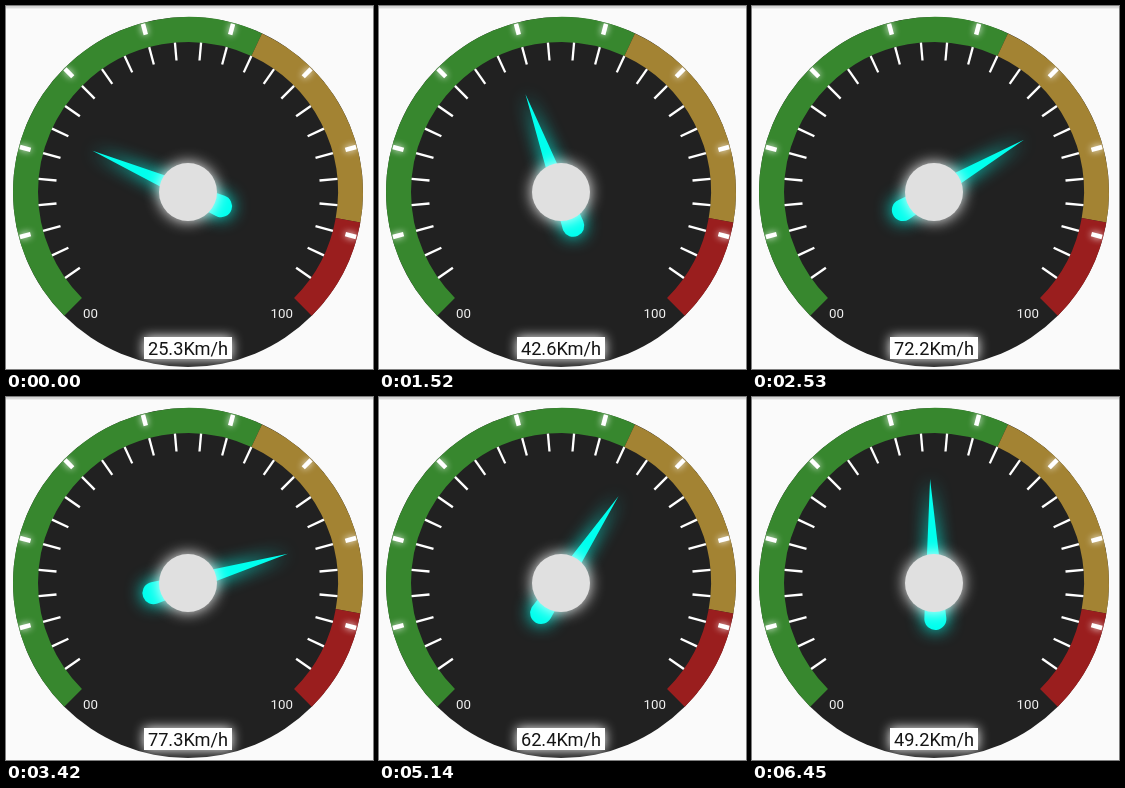
These frames come from a looping animation (367 by 363 pixels, 6480 ms). An HTML page with a canvas:

```html
<!DOCTYPE html>
<html lang="en">
<head>
<meta charset="utf-8">
<title>Speed gauge</title>
<style>
  html, body { margin: 0; width: 100%; height: 100%; overflow: hidden; background: #fafafa; }
  canvas { display: block; width: 367px; height: 363px; }
</style>
</head>
<body>
<canvas id="gauge" width="367" height="363"></canvas>
<script>
const ctx = document.getElementById('gauge').getContext('2d');
const W = 367, H = 363, CX = 182, CY = 186, R = 175;
const LOOP = 6480, STEP = 60;
const FONT = 'Roboto, "Open Sans", sans-serif';
const rad = deg => deg * Math.PI / 180;

// [time in ms, speed]
const keys = [
  [0, 25.3], [320, 23.2], [680, 26.4], [900, 26.2], [1160, 26.6],
  [1340, 33.8], [1640, 48.2], [1940, 59.0], [2000, 60.7], [2350, 69.7],
  [2700, 75.3], [3100, 78.0], [3420, 77.3], [3800, 76.4], [4010, 77.0],
  [4280, 79.6], [4480, 78.0], [4600, 74.4], [4660, 72.4], [5000, 65.0],
  [5320, 59.3], [5730, 52.2], [6100, 50.0], [6450, 49.2]
];

const secant = keys.slice(1).map(([t, v], i) => (v - keys[i][1]) / (t - keys[i][0]));

// Harmonic-mean tangents keep the curve free of overshoot.
const tangent = keys.map((_, i) => {
  const a = secant[i - 1], b = secant[i];
  if (a === undefined) return b;
  if (b === undefined) return a;
  return a * b <= 0 ? 0 : 2 * a * b / (a + b);
});

function speedAt(t) {
  let i = 0;
  while (i < keys.length - 2 && t >= keys[i + 1][0]) i++;
  const [t0, v0] = keys[i], [t1, v1] = keys[i + 1];
  const d = t1 - t0, u = Math.min(1, (t - t0) / d);
  const u2 = u * u, u3 = u2 * u;
  return v0 * (2 * u3 - 3 * u2 + 1) + v1 * (3 * u2 - 2 * u3) +
    d * (tangent[i] * (u3 - 2 * u2 + u) + tangent[i + 1] * (u3 - u2));
}

// The needle advances in even steps, realigned at these times.
const aligned = [5730, 4600, 4010, 2700, 80];

function snap(t) {
  const start = aligned.find(s => t >= s);
  return start === undefined ? 0 : start + STEP * Math.floor((t - start) / STEP);
}

function disc(x, y, r, color) {
  ctx.fillStyle = color;
  ctx.beginPath();
  ctx.arc(x, y, r, 0, 2 * Math.PI);
  ctx.fill();
}

function band(from, to, color) {
  ctx.strokeStyle = color;
  ctx.lineWidth = 25;
  ctx.beginPath();
  ctx.arc(CX, CY, R - 12.5, rad(from), rad(to));
  ctx.stroke();
}

function tick(deg, inner, outer, width) {
  const c = Math.cos(rad(deg)), s = Math.sin(rad(deg));
  ctx.strokeStyle = '#fff';
  ctx.lineWidth = width;
  ctx.beginPath();
  ctx.moveTo(CX + inner * c, CY + inner * s);
  ctx.lineTo(CX + outer * c, CY + outer * s);
  ctx.stroke();
}

function text(str, x, y, size, color) {
  ctx.font = `${size}px ${FONT}`;
  ctx.textAlign = 'center';
  ctx.fillStyle = color;
  ctx.fillText(str, x, y);
}

function withGlow(color, blur, paint) {
  ctx.save();
  ctx.shadowColor = color;
  ctx.shadowBlur = blur;
  paint();
  ctx.restore();
}

function drawDial() {
  ctx.fillStyle = '#fafafa';
  ctx.fillRect(0, 0, W, H);
  ['#d2d2d2', '#d9d9d9', '#ececec'].forEach((color, y) => {
    ctx.fillStyle = color;
    ctx.fillRect(0, y, W, 1);
  });

  disc(CX, CY, R, '#212121');
  band(135, 295, '#37872e');
  band(295, 370, '#a38333');
  band(370, 405, '#9a1e1e');

  for (let a = 145; a <= 395; a += 10) tick(a, 132, 150, 2.3);
  for (let a = 165; a <= 375; a += 30) withGlow('#fff', 7, () => tick(a, 163, 174, 4.5));

  text('00', 84.5, 312, 13.3, '#f0f0f0');
  text('100', 275.7, 312, 13.3, '#f0f0f0');
}

// A teardrop: a round tail joined to the tip by its two tangents.
function drawNeedle(speed) {
  const tip = 104, tail = -36, r = 11;
  const side = Math.acos(r / (tip - tail));
  ctx.save();
  ctx.translate(CX, CY);
  ctx.rotate(rad(135 + 2.7 * speed));
  withGlow('#00ffee', 17, () => {
    ctx.fillStyle = '#00ffee';
    ctx.beginPath();
    ctx.moveTo(tip, 0);
    ctx.arc(tail, 0, r, side, 2 * Math.PI - side);
    ctx.closePath();
    ctx.fill();
  });
  ctx.restore();
  withGlow('#fff', 15, () => disc(CX, CY, 29, '#e0e0e0'));
}

function drawReadout(speed) {
  withGlow('#fff', 12, () => {
    ctx.fillStyle = '#fff';
    ctx.fillRect(138, 331, 88, 22);
  });
  text(speed.toFixed(1) + 'Km/h', 182, 349, 18.2, '#151515');
}

const begin = performance.now();

function frame() {
  const speed = speedAt(snap((performance.now() - begin) % LOOP));
  drawDial();
  drawNeedle(speed);
  drawReadout(speed);
  requestAnimationFrame(frame);
}
frame();
</script>
</body>
</html>
```
